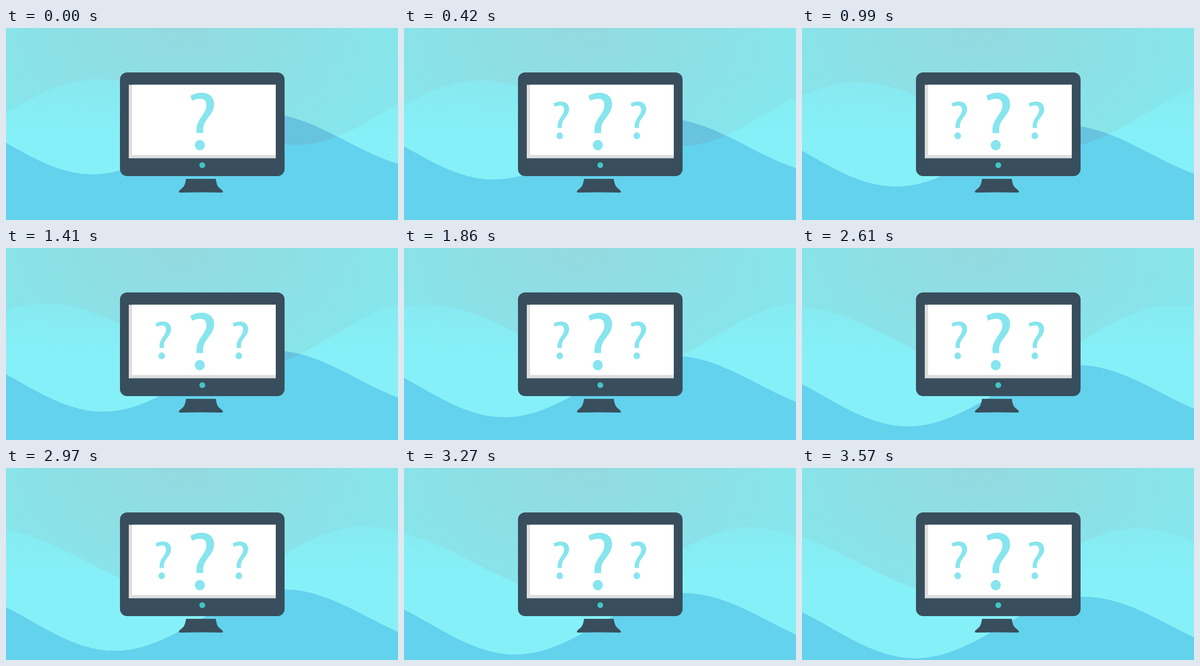
An HTML page with a canvas for the animation above (3600 ms loop, 712 px wide and 350 px high).

```html
<!DOCTYPE html>
<html lang="en">
<head>
<meta charset="utf-8">
<title>Question marks on a screen</title>
<style>
html, body { margin: 0; width: 100%; height: 100%; overflow: hidden; background: #86e6eb; }
canvas { display: block; width: 712px; height: 350px; }
</style>
</head>
<body>
<canvas id="stage" width="712" height="350"></canvas>
<script>
const W = 712, H = 350, LOOP = 3600, STEP = 30;
const MARKS_AT = 210;
const SINE = 0.364; // bezier handle length that follows half a sine wave
const ctx = document.getElementById('stage').getContext('2d');

// Crests and troughs at time zero, drift in px per ms
const front = {
  vx: 0.01373, vy: 0.0224,
  line: swell([-152, 155], [157, 267], [463, 155], [772, 257])
};
const back = {
  vx: -0.068, vy: 0.0057,
  line: swell([-152, 208], [166, 93], [529, 213], [851, 89.5], [1200, 210])
};

const hook = new Path2D(
  'M0 5.5C6 2 13 0 20 0C34 0 43 8 43 21C43 32 37 39 31 47C25 55 23 60 23 68V73.5H11V68' +
  'C11 58 15 51 20 43.5C26 35 29 30 29 23C29 15 25 11 18 11C13 11 7 12.5 3 14.5Z');
const dot = new Path2D();
dot.ellipse(17, 95.5, 9, 9.5, 0, 0, Math.PI * 2);

const stand = new Path2D(
  'M327 275H381C382 281 383 287 387 291C390 294 394 296 394 298.5Q394 300 390 300' +
  'Q354 299 318 300Q314 300 314 298.5C314 296 318 294 321 291C325 287 326 281 327 275Z');

const sky = ctx.createRadialGradient(320, 0, 0, 320, 0, 400);
sky.addColorStop(0, '#94d9e0');
sky.addColorStop(1, '#86e6eb');

const glow = ctx.createLinearGradient(0, 90, 0, 205);
glow.addColorStop(0, 'rgba(134,240,248,.45)');
glow.addColorStop(1, 'rgba(134,240,248,1)');

// Sine-like line through its turning points, closed below the stage
function swell(first, ...rest) {
  const path = new Path2D();
  let [x, y] = first;
  path.moveTo(x, y);
  for (const [nx, ny] of rest) {
    const reach = (nx - x) * SINE;
    path.bezierCurveTo(x + reach, y, nx - reach, ny, nx, ny);
    [x, y] = [nx, ny];
  }
  path.lineTo(x, 2 * H);
  path.lineTo(first[0], 2 * H);
  path.closePath();
  return path;
}

function waveAt(wave, t) {
  const path = new Path2D();
  path.addPath(wave.line, new DOMMatrix().translate(wave.vx * t, wave.vy * t));
  return path;
}

function fill(path, color) {
  ctx.fillStyle = color;
  ctx.fill(path);
}

function box(x, y, w, h, color) {
  ctx.fillStyle = color;
  ctx.fillRect(x, y, w, h);
}

function backdrop() {
  const squash = 0.65;
  ctx.save();
  ctx.scale(1, squash);
  box(0, 0, W, H / squash, sky);
  ctx.restore();
}

function waves(t) {
  const far = waveAt(back, t), near = waveAt(front, t);
  fill(far, glow);
  fill(near, '#68c3df');
  ctx.save();
  ctx.clip(far);
  fill(near, '#63d2ed');
  ctx.restore();
}

function monitor() {
  const body = new Path2D(), button = new Path2D();
  body.roundRect(207, 81, 299, 189, 13);
  button.arc(356.5, 250, 5.3, 0, Math.PI * 2);
  fill(body, '#384e5d');
  fill(stand, '#384e5d');
  box(223, 103.5, 267, 134, '#dedede');
  box(229, 103.5, 261, 128, '#fff');
  fill(button, '#45c4c6');
}

function mark(x, y, scale) {
  ctx.save();
  ctx.translate(x, y);
  ctx.scale(scale, scale);
  fill(hook, '#86e5ee');
  fill(dot, '#86e5ee');
  ctx.restore();
}

function draw(t) {
  backdrop();
  waves(t);
  monitor();
  mark(335, 118, 1);
  if (t >= MARKS_AT) {
    for (const x of [271.7, 411.7]) mark(x, 134, 0.655);
  }
}

const start = performance.now();
function tick() {
  const t = (performance.now() - start) % LOOP;
  draw(Math.floor(t / STEP) * STEP);
  requestAnimationFrame(tick);
}
tick();
</script>
</body>
</html>
```
